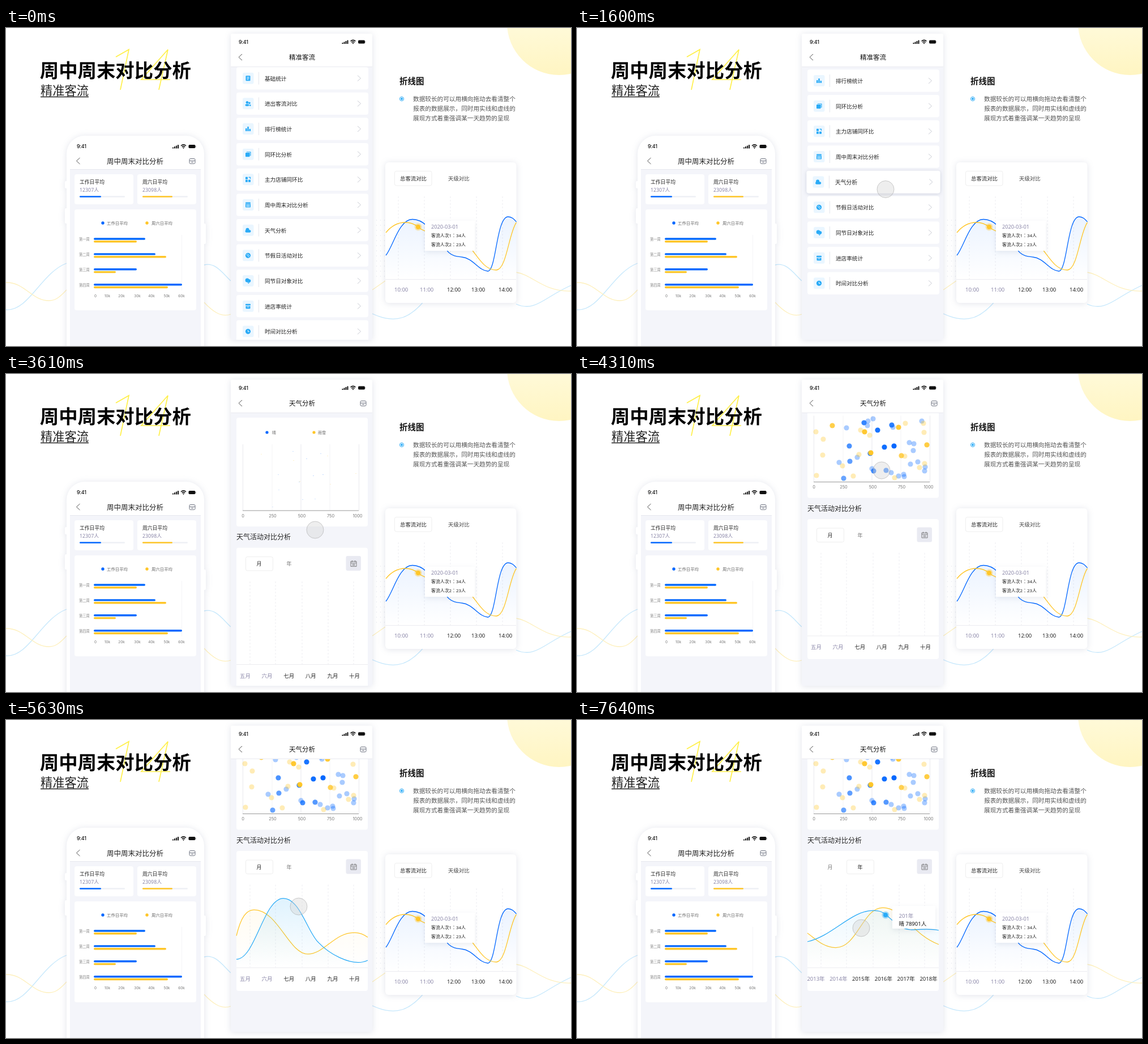
Animation, 998 px wide and 561 px high, one loop 8 s. Source, as an HTML page:

```html
<!DOCTYPE html>
<html lang="zh-CN">
<head>
<meta charset="utf-8">
<style>
html, body { margin: 0; width: 100%; height: 100%; overflow: hidden; background: #fff; }
svg { display: block; width: 998px; height: 561px; }
text { font-family: "Noto Sans", "Noto Sans CJK SC", "Noto Sans CJK", sans-serif; }
.ui { font-family: Inter, "Noto Sans", sans-serif; }
.lift { filter: drop-shadow(0 1px 6px rgba(60, 75, 120, .15)); }
.tip { filter: drop-shadow(0 3px 5px rgba(60, 75, 120, .1)); }
.line { fill: none; stroke-width: 1.25; vector-effect: non-scaling-stroke; }
</style>
</head>
<body>
<svg id="stage" viewBox="0 0 998 561"></svg>
<script>
const BLUE = '#0468ff', YELLOW = '#ffc629', SKY = '#2aabf7', MUTED = '#8a86a8', INK = '#222', PAGE = '#f4f5fa';

// ---- markup helpers; text is placed by its vertical centre ----
const text = (x, cy, size, str, fill = INK, extra = '') =>
  `<text x="${x}" y="${cy + size * 0.37}" font-size="${size}" fill="${fill}" ${extra}>${str}</text>`;
const mid = (x, cy, size, str, fill, extra = '') => text(x, cy, size, str, fill, 'text-anchor="middle" ' + extra);
const box = (x, y, x2, y2, r = 4, fill = '#fff', extra = '') =>
  `<rect x="${x}" y="${y}" width="${x2 - x}" height="${y2 - y}" rx="${r}" fill="${fill}" ${extra}/>`;
const dot = (x, y, r, fill, extra = '') => `<circle cx="${x}" cy="${y}" r="${r}" fill="${fill}" ${extra}/>`;
const path = (d, stroke, width = 1, extra = '') =>
  `<path d="${d}" fill="none" stroke="${stroke}" stroke-width="${width}" ${extra}/>`;
const bar = (x, x2, y, w, color) => path(`M${x + w / 2} ${y}H${x2 - w / 2}`, color, w, 'stroke-linecap="round"');
const group = (id, inner, extra = '') => `<g id="${id}" ${extra}>${inner}</g>`;
const at = (x, y, inner) => `<g transform="translate(${x} ${y})">${inner}</g>`;
const marker = (x, y, color) => dot(x, y, 6.5, color, 'opacity=".4"') + dot(x, y, 4, color);
const dashes = (xs, y, y2) => xs.map(x => path(`M${x} ${y}V${y2}`, '#ececf1', 1, 'stroke-dasharray="3 3"')).join('');
const gradient = (id, color, from) => `<linearGradient id="${id}" x2="0" y2="1">
  <stop stop-color="${color}" stop-opacity="${from}"/><stop offset="1" stop-color="${color}" stop-opacity="0"/></linearGradient>`;

const back = (x, y) => path(`M${x + 6} ${y - 5.5}l-6 5.5l6 5.5`, '#555', 1);
const shopIcon = (x, y) => at(x, y, box(-5, -4.5, 5, 4.3, 1.8, 'none', 'stroke="#5d6272" stroke-width=".9"') +
  path('M-5-.8H5M-2 1.6H2', '#5d6272', 0.9));
const statusBar = (x, x2, y) => text(x, y, 9, '9:41', '#111', 'class="ui" font-weight="500" letter-spacing="-.3"') + at(x2, y,
  [0, 1, 2, 3].map(i => box(i * 3, 1.5 - i * 1.5, i * 3 + 2, 3.5, 0.5, '#111')).join('') +
  path('M15-1.2Q19.5-5 24-1.2M16.8 .9Q19.5-1.4 22.2 .9', '#111', 1.5) + dot(19.5, 2.6, 1.1, '#111') +
  box(28.5, -3, 40.5, 3, 1.8, '#111') + box(41, -1, 42, 1, 0.4, '#999'));

// ---- background and headings ----
const backdrop = () => dot(977, -9, 92, 'url(#sun)') +
  path('M0 497C40 500 62 432 107 415M350 418C370 413 382 432 397 446M647 504C690 524 715 510 740 480M901 487C935 502 950 475 998 454', '#c6e8fc', 1.3) +
  path('M0 449C33 448 45 481 76 481C90 481 99 470 107 462M350 484C365 500 380 511 397 505M647 462L670 446M901 431C930 435 950 466 998 464', '#fef0bd', 1.3) +
  [...Array(36)].map((_, i) => dot(654.5 + i % 3 * 7, 339 + (i / 3 | 0) * 9, 0.6, '#d6dae3')).join('') +
  path('M194 51L217 38L202 109M270 109L286 38L239 91H290', '#fff04a', 1.7) +
  text(59.8, 74.5, 33.4, '周中周末对比分析', '#000', 'font-weight="700"') +
  text(61, 110.5, 21.25, '精准客流') + path('M61 121.5H146', INK, 1.4) +
  text(695, 94, 14.5, '折线图', '#111', 'font-weight="700"') +
  dot(699, 125, 3.6, '#fff', `stroke="${SKY}"`) + dot(699, 125, 2, SKY) +
  ['数据较长的可以用横向拖动去看清整个', '报表的数据展示，同时用实线和虚线的', '展现方式着重强调某一天趋势的呈现']
    .map((s, i) => text(719, 125.3 + i * 16.7, 10.65, s, '#555')).join('');

// ---- left phone ----
const summary = (x, label, value, length, color) => box(x - 9, 258, x + 95, 311) +
  text(x, 271.3, 8.8, label) + text(x, 286, 8.8, value, MUTED) +
  bar(x, x + 80, 297.5, 2.6, '#eef0f5') + bar(x, x + length, 297.5, 2.6, color);
const leftPhone = () =>
  `<g class="lift">${box(104, 270, 110, 283, 2)}${box(104, 318, 110, 345, 2)}${box(347, 345, 353, 381, 2)}${box(107, 190, 350, 620, 32)}</g>` +
  box(113, 250, 344, 561, 0, PAGE) + path('M113 249.5H344', '#e6e7ee') + statusBar(125, 294, 209) +
  back(124.5, 234.5) + mid(228, 235, 12.5, '周中周末对比分析') + shopIcon(329, 235) +
  summary(130, '工作日平均', '12307人', 38, BLUE) + summary(241, '周六日平均', '23098人', 53, YELLOW) +
  box(121, 320, 336, 498) + path('M310.5 365V463', '#f4f4f7') +
  dot(171, 344, 2.7, BLUE) + text(178, 344, 7.4, '工作日平均', '#666') +
  dot(249, 344, 2.7, YELLOW) + text(257, 344, 7.4, '周六日平均', '#666') +
  [['一', 246, 231], ['二', 264, 283], ['三', 231, 194], ['四', 311, 286]].map(([n, a, b], i) => {
    const y = 372 + i * 26.9;
    return text(129, y + 0.8, 6.3, `第${n}周`, '#888') + bar(155, a, y, 3.4, BLUE) + bar(155, b, y + 4.8, 3.4, YELLOW);
  }).join('') +
  [158, 179, 204, 232, 257, 284, 310].map((x, i) => mid(x, 472.3, 6.3, i ? i + '0k' : '0', '#777', 'class="ui"')).join('');

// ---- right card ----
const rightBlue = 'M671 401C684 385 694 337.5 718 337.5C745 337.5 760 372 782 396C790 403 797 403 805 404C825 406 835 428 851 429C866 429 866 333 887 333C894 333 898 338 901.5 342';
const rightCard = () => box(670, 237, 901.5, 485, 6, '#fff', 'class="lift"') +
  box(686.5, 252.5, 752, 278, 3, '#fff', 'stroke="#eee"') +
  text(696, 265.3, 9.4, '总客流对比') + text(781, 265.3, 9.4, '天级对比', '#444') +
  dashes([693, 739, 785, 831, 877], 297, 443) + path('M670 443.5H901', '#ececf0') +
  `<path d="${rightBlue}V443H671Z" fill="url(#fillDeep)"/>` + path(rightBlue, BLUE, 1.3) +
  path('M671 361C680 350 690 343 705 343C715 343 722 346 728 351C750 372 793 346 822 390C835 406 846 427 866 427C884 427 888 362 901.5 343', YELLOW, 1.3) +
  marker(728, 351, YELLOW) + box(740, 340, 828, 393, 1, '#fff', 'class="tip"') +
  text(751, 350.5, 9.2, '2020-03-01', MUTED) +
  ['客流人次1：34人', '客流人次2：23人'].map((s, i) => text(751, 366.3 + i * 16, 7.9, s, INK, 'lang="zh-TW"')).join('') +
  [686, 731, 779, 822, 870].map((x, i) => text(x, 461, 9.5, `1${i}:00`, i < 2 ? MUTED : INK)).join('');

// ---- centre phone: list ----
const white = (d, w = 0.9) => path(d, '#fff', w);
const tile = (x, y, x2, y2, r = 1) => box(x, y, x2, y2, r, SKY);
const rows = [
  ['基础统计', tile(-4, -4.5, 4, 4.5) + white('M-2-2H2M-2 0H2M-2 2H1')],
  ['进出客流对比', dot(-1.5, -2, 2.3, SKY) + dot(2.5, -1, 1.8, SKY) + tile(-5, 1, 2, 4.5, 1.8) + tile(2.6, 1.6, 5, 4.5)],
  ['排行榜统计', tile(-4.5, -1, -2, 4, 0.5) + tile(-1.2, -4, 1.3, 4, 0.5) + tile(2.1, 0, 4.6, 4, 0.5)],
  ['同环比分析', tile(-3, -4.5, 5, 3) + white('M-5-3H3.4V4') + tile(-4.5, -2.7, 3, 4.5)],
  ['主力店铺同环比', tile(-4.5, -4.5, -0.5, -0.5, 0.5) + tile(-4.5, 0.5, -0.5, 4.5, 0.5) + tile(0.5, 0.5, 4.5, 4.5, 0.5) + path('M1-4H4V-1', SKY, 1.3)],
  ['周中周末对比分析', tile(-4.5, -4.5, 4.5, 4.5) + white('M-4.5-2H4.5M-3.5 .5H3.5M-3.5 2.7H3.5M-1.5-1V4M1.5-1V4', 0.6)],
  ['天气分析', dot(-1, -1, 3, SKY) + tile(-5, -0.5, 5, 4, 2.2)],
  ['节假日活动对比', dot(0, 0, 4.6, SKY) + white('M-3-2L2 3M-1-3L3 1')],
  ['同节日对象对比', dot(-1.4, -1, 3.5, SKY) + dot(2, 0, 2.8, SKY) + path('M-1 2L1 5L2 2', SKY)],
  ['进店率统计', tile(-4.5, -4, 4.5, -0.8) + tile(-4, -0.5, 4, 4.5) + white('M-4-.7H4M-1.8 1.5H1.8')],
  ['时间对比分析', dot(0, 0, 4.6, SKY) + white('M0-2.5V.4H2.5')]
];
const rowMarkup = ([label, icon], i) => `<g transform="translate(523.5 ${88.7 + i * 44.66})">` + group('row' + i,
  box(-116.5, -19.7, 116.5, 19.7) + box(-105.5, -10, -86, 10, 3, '#eaf6ff') + at(-96, 0, icon) +
  path('M-77-11V11', '#e4e6ec') + text(-66.5, 0.5, 9.65, label) + path('M97.5-5L103 0L97.5 5', '#c4c7d0', 0.9)) + '</g>';

// ---- centre phone: weather page; strong dots run from solid to faint ----
const scatter = {
  paleBlue: [476,95, 514,83, 523,79, 513,91, 558,94, 609,83, 587,121, 595,123, 594,135, 463,156, 495,147, 521,167,
    589,159, 602,155, 615,164, 555,174, 568,180, 577,177, 578,181, 614,171],
  paleYellow: [422,102, 435,115, 434,143, 423,179, 469,162, 498,142, 488,180, 517,108, 501,99, 580,87, 612,87, 613,103,
    579,145, 561,183, 605,165, 614,158],
  strongBlue: [560,127, 543,129, 531,99, 518,140, 556,90, 507,86, 524,171, 481,127, 546,170, 482,154, 471,184],
  strongYellow: [519,139, 508,102, 568,94, 618,125, 451,91, 573,144]
};
const dots = kind => {
  const color = kind.endsWith('Blue') ? BLUE : YELLOW, pale = kind.startsWith('pale');
  let out = '';
  for (let i = 0; i < scatter[kind].length; i += 2)
    out += dot(scatter[kind][i], scatter[kind][i + 1] + 50.5, 0, color, `opacity="${pale ? 0.34 : 1 - i * 0.02}"`);
  return group(kind, out);
};
const curve = (d, color, fill) =>
  `<path d="${d}V436H407Z" fill="url(#${fill})"/><path d="${d}" class="line" stroke="${color}"/>`;
const tooltip = (id, x, y, head, value, dy) => group(id, marker(x, y, SKY) +
  box(x + 12, y - 16, x + (dy ? 88 : 85), y + 24, 1, '#fff', 'class="tip"') +
  text(x + 23.5, y + dy, 9.5, head, MUTED) + text(x + 23.5, y + dy + 14.7, 9.5, value, '#111'));
const tabs = (x, month, year) => box(x, 322.5, x + 48, 347, 3, '#fff', 'stroke="#eee"') +
  mid(447, 334.8, 9, '月', month) + mid(500, 334.8, 9, '年', year);
const axisLabels = (x, step, labels) =>
  labels.map((s, i) => mid(x + i * step, 532.3, 9.5, s, i < 2 ? MUTED : INK)).join('');

const weather = () =>
  box(407, 77, 639, 269) + dot(461, 103, 2.6, BLUE) + text(470, 103.3, 7, '晴', '#666') +
  dot(544, 103, 2.6, YELLOW) + text(551, 103.3, 7, '雨雪', '#666') +
  path('M418.5 124V241M521 124V241M623.5 124V241', '#e9e9ee') + path('M470 124V241M572 124V241', '#f3f3f6') +
  path('M418 241H623', '#999') +
  [418.5, 471, 522.5, 573.5, 621].map((x, i) => mid(x, 249.8, 7.4, i * 250, '#777', 'class="ui"')).join('') +
  Object.keys(scatter).map(dots).join('') +
  text(407, 287.7, 12, '天气活动对比分析') + box(407, 306.5, 639, 553.5) +
  box(600.5, 321, 627, 347, 3, '#e9eaf2') +
  at(614, 334.5, path('M-5-4H5V5H-5ZM-5-1.2H5M-2.5-5.5V-3M2.5-5.5V-3M-2.5 1H2.5M-2.5 3H2.5', '#666', 0.8)) +
  dashes([431, 476, 523, 569, 614], 366, 512) + path('M407 512.5H639', '#ececf0') +
  group('monthUi', tabs(423.5, INK, '#777') + axisLabels(422.5, 38.6, ['五月', '六月', '七月', '八月', '九月', '十月'])) +
  group('yearUi', tabs(476.5, '#777', INK) + axisLabels(422, 39.8, [3, 4, 5, 6, 7, 8].map(n => `201${n}年`))) +
  at(0, 75.5,
    group('monthCurves',
      curve('M407 376C415 340 425 326.5 438 326.5C480 326.5 500 411 533 411C562 411 580 370 615 370C625 370 633 374 639 379', YELLOW, 'fillYellow') +
      curve('M407 421C440 421 455 304.5 490 304.5C519 304.5 533 370 552 389C575 415 605 427 622 427C630 427 635 425 639 423', SKY, 'fillSky')) +
    group('yearCurves',
      curve('M407 376C420 385 435 401.5 457 401.5C495 401.5 505 331 540 331C575 331 590 377 639 396', YELLOW, 'fillYellow') +
      curve('M407 391C450 382 485 336 523 336C535 336 540 339 545 343C560 355 570 369 590 370C610 370 620 367 639 371', SKY, 'fillPale')) +
    tooltip('monthTip', 516, 324, '2020-07', '晴 2321人', 0) +
    tooltip('yearTip', 545, 344, '201年', '晴 78901人', 1));

const centrePhone = () => box(397, 10, 647, 550, 3, '#fff', 'class="lift"') + box(397, 68, 647, 550, 3, PAGE) +
  '<g clip-path="url(#screen)">' + group('list', group('rows', rows.map(rowMarkup).join(''))) +
  group('detail', group('page', weather())) + '</g>' +
  path('M397 68.5H647', '#e9eaf0') + statusBar(411, 593.5, 24.5) + back(411, 51.5) +
  group('listTitle', mid(523, 52, 11.5, '精准客流', '#111', 'font-weight="500"')) +
  group('detailTitle', mid(523, 52, 11.5, '天气分析', '#111', 'font-weight="500"') + shopIcon(631, 52));

stage.innerHTML = '<defs><clipPath id="screen"><rect x="397" y="69" width="250" height="481"/></clipPath>' +
  '<linearGradient id="sun" x2="0" y2="1"><stop offset=".5" stop-color="#fffada"/><stop offset="1" stop-color="#fff5c2"/></linearGradient>' +
  gradient('fillDeep', BLUE, 0.08) + gradient('fillSky', SKY, 0.15) + gradient('fillPale', SKY, 0.08) +
  gradient('fillYellow', YELLOW, 0.06) + '</defs>' +
  backdrop() + leftPhone() + rightCard() + centrePhone() +
  dot(0, 0, 15, '#d4d4d4', 'id="cursor" stroke="#999" stroke-opacity=".6" stroke-width=".8"');

// ---- motion ----
const $ = id => document.getElementById(id);
const span = (t, a, b) => Math.min(1, Math.max(0, (t - a) / (b - a)));
const inOut = p => p < 0.5 ? 2 * p * p : 1 - 2 * (1 - p) ** 2;
const out = p => Math.sin(p * Math.PI / 2);
const set = (id, name, value) => $(id).setAttribute(name, value);
const fade = (id, value) => set(id, 'opacity', value);
const stretch = (id, base, k) => {
  fade(id, k > 0 ? 1 : 0);
  set(id, 'transform', `translate(0 ${base * (1 - k)}) scale(1 ${Math.max(k, 0.001)})`);
};
const pointer = [[270, 545, 292], [830, 545, 104], [1540, 545, 104], [1600, 545, 284.5], [1800, 546, 292], [3540, 546, 292],
  [3610, 546, 275], [4310, 538, 170], [5140, 538, 170], [5630, 517, 329], [5770, 516, 324], [6340, 516, 324],
  [6740, 499, 259], [7150, 499, 259], [7640, 502, 367]];
const pointerAt = t => {
  let i = 1;
  while (i < pointer.length - 1 && t > pointer[i][0]) i++;
  const [a, b] = [pointer[i - 1], pointer[i]], p = inOut(span(t, a[0], b[0]));
  return [a[1] + (b[1] - a[1]) * p, a[2] + (b[2] - a[2]) * p];
};

function render(t) {
  set('rows', 'transform', `translate(0 ${-85 * inOut(span(t, 270, 830))})`);
  const press = span(t, 1540, 1600) * (1 - inOut(span(t, 1900, 2300)));
  set('row6', 'transform', `scale(${1 + 0.014 * press})`);
  $('row6').style.filter = press ? `drop-shadow(0 1px 3px rgba(60,75,120,${0.2 * press}))` : 'none';

  const swap = span(t, 2500, 2780);
  fade('list', 1 - swap); fade('listTitle', 1 - swap);
  fade('detail', swap); fade('detailTitle', swap);

  const scroll = 50.5 * inOut(span(t, 3610, 4310)) + 25 * out(span(t, 4380, 4940));
  set('page', 'transform', `translate(0 ${-scroll})`);
  for (const kind in scatter) {
    const pale = kind.startsWith('pale');
    [...$(kind).children].forEach((c, i) => {
      const start = pale ? 3620 + i * 5 : 3575;
      c.setAttribute('r', t < 3600 ? 0 : 4.6 * out(span(t, start, start + 600)));
    });
  }

  const year = t >= 7010;
  fade('monthUi', year ? 0 : 1); fade('yearUi', year ? 1 : 0);
  stretch('monthCurves', 436, year ? 0 : inOut(span(t, 5140, 5750)));
  stretch('yearCurves', 402, inOut(span(t, 7090, 7600)));
  fade('monthTip', year ? 0 : span(t, 6300, 6600));
  fade('yearTip', span(t, 7400, 7620));

  const [x, y] = pointerAt(t), pressing = span(t, 6700, 6850) * (1 - span(t, 7010, 7150));
  set('cursor', 'transform', `translate(${x} ${y})`);
  set('cursor', 'fill-opacity', 0.4 + 0.32 * pressing);
  fade('cursor', t < 270 ? 0 : 1);
}
(function loop() {
  render(performance.now() % 8000);
  requestAnimationFrame(loop);
})();
</script>
</body>
</html>
```
